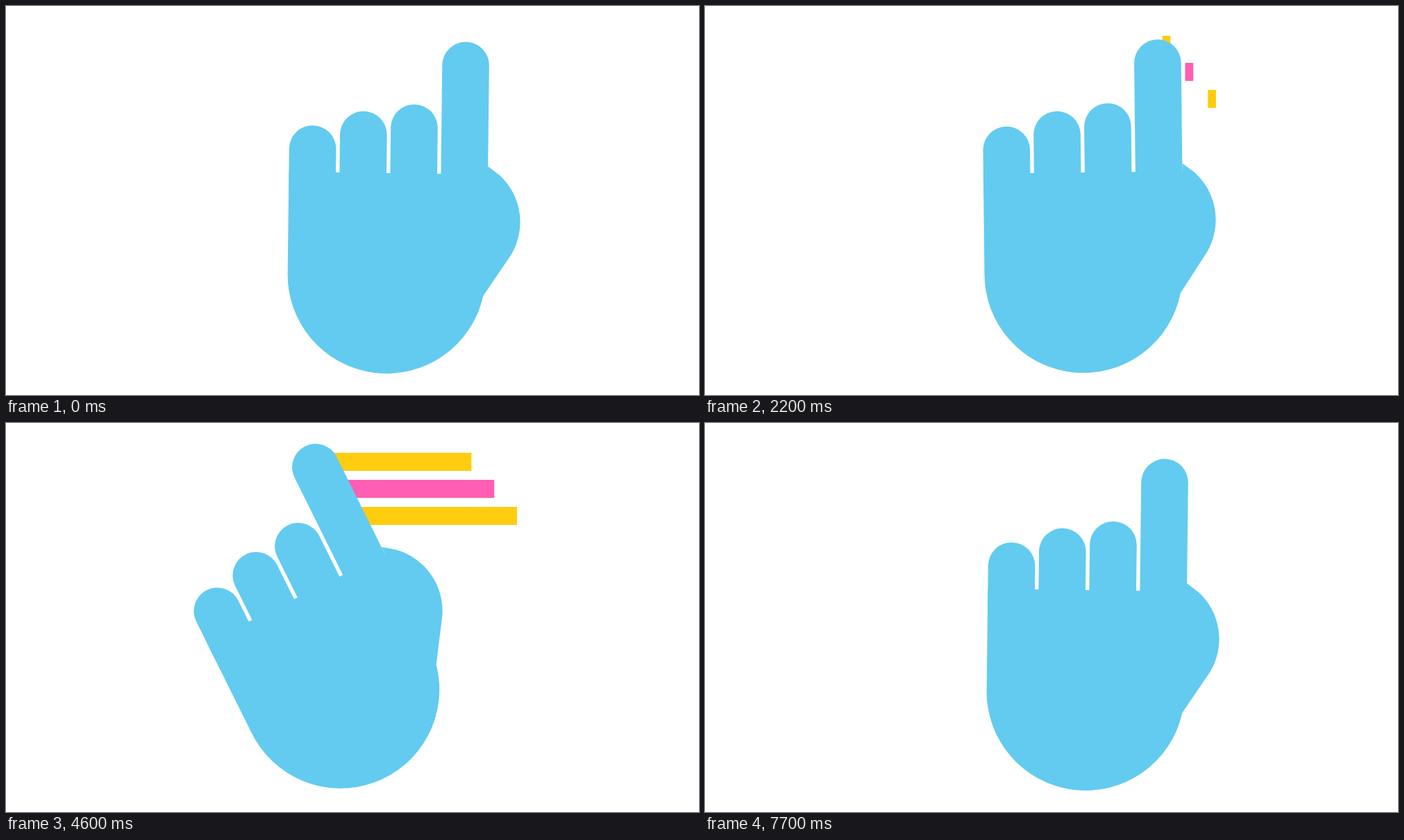
These frames come from a looping animation (998x561 px, 8000 ms). An HTML page:

```html
<!DOCTYPE html>
<html lang="en">
<head>
<meta charset="utf-8">
<title>Swipe</title>
<style>
  html, body { margin: 0; width: 100%; height: 100%; overflow: hidden; background: #fff; }
  svg { display: block; width: 100%; height: 100%; }
</style>
</head>
<body>
<svg viewBox="0 0 998 561">
  <g id="bars">
    <rect y="43" height="26" fill="#ffcc0f"/>
    <rect y="82" height="26" fill="#ff5eb2"/>
    <rect y="121" height="26" fill="#ffcc0f"/>
  </g>
  <g id="hand" fill="#63cbef">
    <rect x="404" y="173" width="67.6" height="130" rx="33.8"/>
    <rect x="477" y="151.7" width="67.6" height="150" rx="33.8"/>
    <rect x="550" y="141" width="67.6" height="160" rx="33.8"/>
    <rect x="623" y="50" width="67.6" height="250" rx="33.8"/>
    <path d="M404 240.5H690.6V229L708 242A92 92 0 0 1 725 357L686 416A142.5 142.5 0 0 1 404 384.5Z"/>
  </g>
</svg>
<script>
  const PERIOD = 2000, STEP = 50;
  const SWING = 660, RETURN = 1000;          // ms
  const REST = 0.68, TURNED = -26.45;        // degrees
  const BAR_LENGTH = 239.7, SHRINK_START = 650, SHRINK = 340;

  const hand = document.getElementById('hand');
  const bars = [...document.getElementById('bars').children];

  const clamp = v => Math.min(1, Math.max(0, v));

  // Cubic Bezier timing curve, solved by bisection.
  function bezier(x1, y1, x2, y2) {
    const at = (a, b, s) => 3 * a * s * (1 - s) ** 2 + 3 * b * s * s * (1 - s) + s ** 3;
    return t => {
      t = clamp(t);
      if (t === 0 || t === 1) return t;
      let lo = 0, hi = 1;
      for (let i = 0; i < 30; i++) {
        const mid = (lo + hi) / 2;
        if (at(x1, x2, mid) < t) lo = mid; else hi = mid;
      }
      return at(y1, y2, lo);
    };
  }

  const snap = bezier(1, 0, 0, 1);
  const ease = bezier(0.25, 0.1, 0.25, 1);

  function draw(t) {
    const out = snap(t / SWING);
    const back = snap((t - RETURN) / SWING);
    const angle = REST + (TURNED - REST) * (out - back);
    hand.setAttribute('transform', `rotate(${angle} 508.5 524)`);

    // Each bar grows leftwards, then its right end catches up.
    const gone = ease((t - SHRINK_START) / SHRINK);
    const width = BAR_LENGTH * Math.max(0, out - gone);
    bars.forEach((bar, i) => {
      bar.setAttribute('x', 670.3 + 32.8 * i - BAR_LENGTH * out);
      bar.setAttribute('width', width);
    });
  }

  const start = performance.now();
  function tick() {
    const t = (performance.now() - start) % PERIOD;
    draw(Math.floor(t / STEP) * STEP);
    requestAnimationFrame(tick);
  }
  tick();
</script>
</body>
</html>
```
